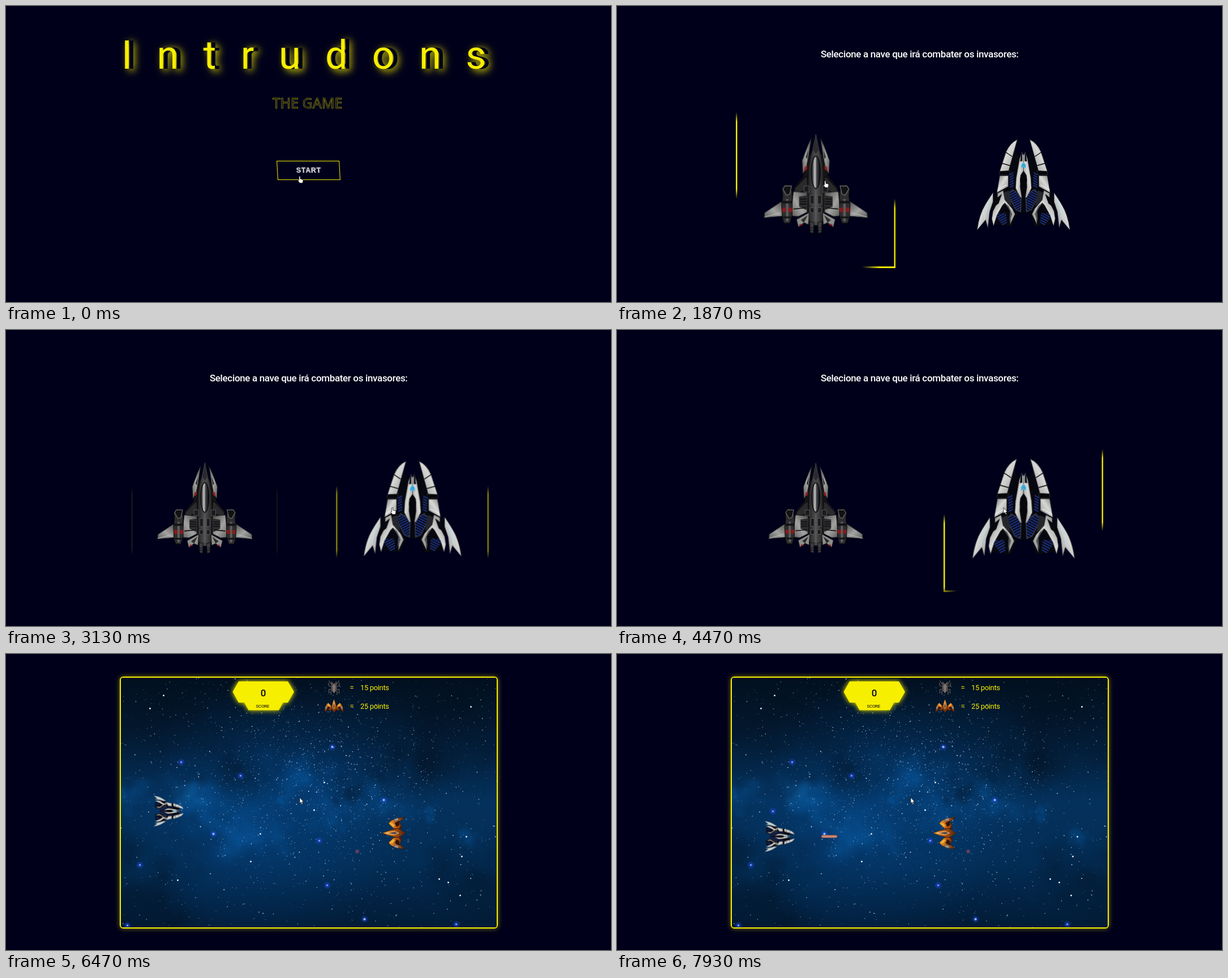
An HTML page with a canvas for the animation above (8000 ms loop, 1069 px wide and 524 px high).

```html
<!DOCTYPE html>
<html lang="pt">
<head>
<meta charset="utf-8">
<title>Intrudons</title>
<style>
:root { --y: #f7ef00; --bg: #00001a; }
html, body { margin: 0; width: 100%; height: 100%; overflow: hidden; background: var(--bg); }
#stage { position: relative; width: 1069px; height: 524px; overflow: hidden; background: var(--bg); font-family: Roboto, "Open Sans", sans-serif; }
section, .layer { position: absolute; left: 0; top: 0; width: 1069px; height: 524px; }
svg { overflow: visible; }
section, section *, .layer * { animation-duration: 8s; animation-iteration-count: infinite; }

/* screens */
#title { animation-name: title; animation-timing-function: step-end; }
#select { animation-name: select; animation-timing-function: step-end; }
#game { animation-name: game; animation-timing-function: step-end; }
@keyframes title { 0% { visibility: visible } 10.875%, 100% { visibility: hidden } }
@keyframes select { 0% { visibility: hidden } 10.875% { visibility: visible } 56.625%, 100% { visibility: hidden } }
@keyframes game { 0% { visibility: hidden } 56.625%, 100% { visibility: visible } }

/* title screen */
h1 { position: absolute; left: 204px; top: 52px; margin: 0; font-size: 70px; font-weight: 400; line-height: 1; letter-spacing: 43.4px; white-space: pre; color: var(--y); text-shadow: 8px 0 0 var(--bg), 8px 3px 16px var(--y), 8px 3px 12px rgba(247, 239, 0, .5); }
.outline { font: 25px "Noto Sans", "Open Sans", sans-serif; fill: none; stroke: var(--y); stroke-width: .5; }
#start { position: absolute; left: 479px; top: 274px; width: 109px; height: 32px; border: 1px solid var(--y); font: bold 12px/33px "Liberation Sans", Arial, sans-serif; letter-spacing: 1px; text-indent: 1px; text-align: center; color: #d2d2d6; -webkit-text-stroke: .5px #d2d2d6; animation-name: lean; animation-timing-function: ease-out; }
@keyframes lean { 0%, .8% { transform: skewX(3deg) } 6.6%, 100% { transform: skewX(20deg) } }

/* ship cards */
.ask { font-size: 17px; font-weight: 500; letter-spacing: -.35px; fill: #fff; text-anchor: middle; }
.card { position: absolute; top: 184.5px; width: 256px; height: 265px; overflow: hidden; animation-timing-function: ease-in-out; }
.card svg { position: absolute; left: 0; top: 0; width: 256px; height: 265px; }
.glow { position: absolute; inset: 0; animation-timing-function: ease-in-out; }
.bar { position: absolute; left: -82px; top: 93px; width: 420px; height: 122px; background: linear-gradient(transparent, var(--y) 11%, var(--y) 89%, transparent); animation-timing-function: linear; }
.cover { position: absolute; inset: 2px; background: var(--bg); }
.a { left: 222.5px; animation-name: growA; }
.a .glow { animation-name: showA; }
.a .bar { animation-name: spinA; }
.b { left: 590.3px; animation-name: growB; }
.b .glow { animation-name: showB; }
.b .bar { animation-name: spinB; }
@keyframes growA { 0%, 19% { transform: none } 23%, 36.125% { transform: scale(1.1) } 39.875%, 100% { transform: none } }
@keyframes showA { 0%, 19% { opacity: 0 } 23%, 36.125% { opacity: 1 } 39.875%, 100% { opacity: 0 } }
@keyframes spinA { 0%, 20.4% { transform: rotate(0deg) } 36.125% { transform: rotate(151deg) } 36.13%, 100% { transform: rotate(0deg) } }
@keyframes growB { 0%, 37% { transform: none } 41.25%, 100% { transform: scale(1.1) } }
@keyframes showB { 0%, 37% { opacity: 0 } 41.25%, 100% { opacity: 1 } }
@keyframes spinB { 0%, 39.125% { transform: rotate(0deg) } 56.625%, 100% { transform: rotate(164.5deg) } }

/* game */
#sky { position: absolute; left: 200.5px; top: 39.5px; border: 2px solid var(--y); border-radius: 6px; box-shadow: 0 0 8px rgba(247, 239, 0, .5); }
.badge { fill: var(--y); filter: drop-shadow(0 0 5px var(--y)); }
.points { font-size: 13px; letter-spacing: -.35px; fill: var(--y); }
.score { fill: #05051c; text-anchor: middle; }
#player { animation-name: dive; animation-timing-function: linear; }
#enemy { animation-name: attack; animation-timing-function: linear; }
#shot { animation-name: shoot; animation-timing-function: linear; }
@keyframes dive { 0%, 87.875% { transform: translate(287.5px, 278px) } 97.25%, 100% { transform: translate(287.5px, 323px) } }
@keyframes attack { 0%, 80.5% { transform: translate(688.2px, 317px) } 100% { transform: translate(574.4px, 317px) } }
@keyframes shoot {
  0%, 97.55% { opacity: 0; transform: translate(317px, 323px) }
  97.56% { opacity: 1; transform: translate(317px, 323px) }
  100% { opacity: 1; transform: translate(385.6px, 323px) }
}

/* pointer */
#pointer { animation-name: move; animation-timing-function: ease-in-out; }
#hand { animation-name: hand; animation-timing-function: step-end; }
#arrow { animation-name: arrow; animation-timing-function: step-end; }
@keyframes move {
  0%, 10.87% { transform: translate(519px, 302px) }
  10.875%, 16.625% { transform: translate(521px, 296px) }
  21.5%, 34.875% { transform: translate(368px, 310px) }
  38.625%, 59.25% { transform: translate(683px, 315px) }
  65%, 100% { transform: translate(519px, 254.5px) }
}
@keyframes hand { 0% { opacity: 1 } 10.875% { opacity: 0 } 19% { opacity: 1 } 36.125% { opacity: 0 } 37% { opacity: 1 } 55.5%, 100% { opacity: 0 } }
@keyframes arrow { 0% { opacity: 0 } 10.875% { opacity: 1 } 19% { opacity: 0 } 36.125% { opacity: 1 } 37% { opacity: 0 } 55.5%, 100% { opacity: 1 } }
</style>
</head>
<body>
<div id="stage">
<svg width="0" height="0" style="position:absolute">
  <defs>
    <linearGradient id="steel" x1="0" y1="0" x2="1" y2="1"><stop offset="0" stop-color="#4c4c4c"/><stop offset=".55" stop-color="#a2a2a0"/><stop offset="1" stop-color="#5c5c5c"/></linearGradient>
    <linearGradient id="hull"><stop offset="0" stop-color="#505052"/><stop offset="1" stop-color="#252527"/></linearGradient>
    <linearGradient id="pearl" x1="1" y1="0" x2="0" y2="1"><stop offset="0" stop-color="#747474"/><stop offset=".45" stop-color="#d8d8d6"/><stop offset="1" stop-color="#8a8a88"/></linearGradient>
    <linearGradient id="glass"><stop offset="0" stop-color="#0b0b0d"/><stop offset=".4" stop-color="#c8c8c8"/><stop offset=".6" stop-color="#44454a"/><stop offset="1" stop-color="#08080a"/></linearGradient>
    <linearGradient id="ember" x1="0" y1="0" x2="0" y2="1"><stop offset="0" stop-color="#f0a030"/><stop offset=".5" stop-color="#b8560f"/><stop offset="1" stop-color="#4a1f0b"/></linearGradient>
    <pattern id="ribs" width="4" height="4" patternUnits="userSpaceOnUse" patternTransform="rotate(28)"><path fill="#0a0c1a" d="M0 0h4v4H0z"/><path fill="#1f3797" d="M0 0h4v1.500H0z"/></pattern>

    <g id="jetHalf">
      <path fill="#141416" d="M0-81 3-62 8-50 15-42 20-12 35 6 36 18 14 28 14 58 0 66z"/>
      <path fill="url(#steel)" stroke="#111" stroke-width=".7" d="M7-75 13-62 22-38 21-16 15-28 12-44z"/>
      <path fill="#222" d="M12-55 16-44 14-40z"/>
      <path fill="#8c2020" d="M14-30 18-27 19-20 14-24z"/>
      <path fill="#2a2a2d" stroke="#0a0a0a" d="M14-12 18-10 34 7 34 16 13 8z"/>
      <path fill="url(#steel)" stroke="#222" stroke-width=".8" d="M14 14 36 12 40 51 28 52 14 45z"/>
      <path fill="#2c2c2e" d="M13 18 27 20 27 36 14 42z"/>
      <path stroke="#0e0e10" stroke-width="1.600" d="M15 24h11M15 28h11M15 32h11M16 38l20 2"/>
      <path fill="url(#steel)" stroke="#333" stroke-width=".8" d="M52 27 58 30 82 46 83 54 52 51z"/>
      <path stroke="#c8c8c8" stroke-width=".8" d="M57 46 82 53"/>
      <path fill="#2d2d2f" stroke="#0b0b0b" d="M38 14 41 3 48 1 54 8 53 20 55 32 54 54 51 63 42 63 38 50z"/>
      <path fill="#121214" stroke="#7c7c7b" stroke-width="1" d="M39 3 50 3 53 8 47 18 42 16z"/>
      <path fill="#5c5c5f" d="M44 24h4v36h-4z"/>
      <path fill="#861b1b" d="M38 38h6v7h-6zM48 38h6v7h-6z"/>
      <path fill="#151516" d="M38 27h16v4H38zM40 52h13v3H40z"/>
      <path fill="#8f8e8b" stroke="#222" stroke-width=".8" d="M11 46 31 57 28 69 19 62 12 65z"/>
      <path fill="#8c2020" d="M20 65 26 64 27 68z"/>
      <path fill="#2c2c2c" d="M13 50 24 58 19 62z"/>
      <path fill="url(#hull)" d="M0-56 5-55 8-44 11-28 12 8 11 56 7 66 0 66z"/>
      <path fill="#1b1b1d" stroke="#626262" stroke-width=".8" d="M11 3h8v10h-8zM3 18h6v14H3zM3 38h6v8H3z"/>
      <path fill="#3c3c3e" stroke="#111" d="M3 62 10 60 9 78 4 79z"/>
      <path stroke="#111" d="M4 70h6M4 74h6"/>
    </g>
    <g id="jet">
      <use href="#jetHalf"/><use href="#jetHalf" transform="scale(-1 1)"/>
      <path fill="#2b2b2d" stroke="#555" stroke-width=".6" d="M0-80 5-55 0-48-5-55z"/>
      <ellipse cy="-19" rx="7" ry="26" fill="url(#glass)" stroke="#0a0a0a" stroke-width="1.500"/>
      <path stroke="#6a6a6a" d="M0 10v50"/>
    </g>

    <g id="alienHalf">
      <path fill="#07080f" d="M16-62 23-30 40-22 46 10 60 32 50 70 20 74 10 48 0 50V-40z"/>
      <path fill="url(#pearl)" stroke="#222" stroke-width=".6" d="M11-80Q24-74 31-58L42-24 27-22Q20-48 11-80z"/>
      <path fill="none" stroke="#0c0c0c" stroke-width="1.500" d="M20-50 32-58M24-34 38-38"/>
      <path fill="url(#ribs)" d="M18-24 25-20 24 6 17 2z"/>
      <path fill="#05050a" stroke="#2c2c30" stroke-width=".8" d="M24-25 42-24 43-18 26-17z"/>
      <path fill="url(#pearl)" stroke="#222" stroke-width=".6" d="M27-16 42-16 47 14 38 9 27 3z"/>
      <path fill="none" stroke="#eee" stroke-width="1.200" d="M30 0 46 9"/>
      <path fill="url(#ribs)" stroke="#4a4b52" d="M4 18 20 8 27 18 14 44 5 48z"/>
      <path fill="#24262c" d="M25 10 35 14 32 31 21 38z"/>
      <path fill="url(#ribs)" d="M31 50 50 51 46 60 37 72 29 67z"/>
      <path fill="url(#pearl)" stroke="#222" stroke-width=".5" d="M36 10 46 15 46 31 54 47 56 60 53 73 47 54 37 36 33 32 22 48 24 71 15 52 20 42 33 27z"/>
      <path fill="#08090f" d="M38 16 48 24 53 40 44 33z"/>
      <path fill="#53555a" d="M26 38 31 33 24 47 25 66 20 52z"/>
      <path fill="url(#pearl)" stroke="#333" stroke-width=".5" d="M54 14Q64 29 68 36Q78 52 82 80L67 62 63 76 60 48 54 30z"/>
      <path fill="none" stroke="#b4dfe9" stroke-width="1.600" d="M58 27Q67 44 69 60"/>
      <path fill="url(#pearl)" stroke="#222" stroke-width=".6" d="M0-52 3-58 7-46 13-12 14 6 6 22 3 23 6 4 5-17 0-24z"/>
      <path fill="#10131d" d="M2-56 4-57 6-41 2-42z"/>
    </g>
    <g id="alien">
      <use href="#alienHalf"/><use href="#alienHalf" transform="scale(-1 1)"/>
      <path fill="#05050a" d="M0-25Q7-16 6-6Q4 6 0 25Q-4 6-6-6Q-7-16 0-25z"/>
      <path fill="#35a9dc" stroke="#8fcfe6" stroke-width=".8" d="M0-40 4-35 4-29 0-32-4-29-4-35z"/>
    </g>

    <g id="foeHalf">
      <path fill="#4a1c08" d="M4 0 16 0 20 10 8 14z"/>
      <path fill="url(#ember)" stroke="#35190c" stroke-width=".7" d="M8-1 17-10Q24-6 27 8L28 19 20 9 13 12 8 9z"/>
      <path fill="#eeb040" d="M11-2 17-8 18-3 13 1z"/>
      <path fill="#98938e" stroke="#333" stroke-width=".5" d="M21 0 25 0 27 7 22 8z"/>
      <path fill="#2e140c" d="M11 4 18 1 22 9 14 9z"/>
    </g>
    <g id="foe">
      <use href="#foeHalf"/><use href="#foeHalf" transform="scale(-1 1)"/>
      <path fill="url(#ember)" stroke="#48200d" stroke-width=".7" d="M0-21 4-10 8 6 5 12 0 20-5 12-8 6-4-10z"/>
      <path fill="none" stroke="#e8c890" d="M0-15 3 0 0 8-3 0z"/>
      <path fill="#4a4a50" d="M0-8 2 1 0 6-2 1z"/>
    </g>

    <g id="bugHalf" fill="none" stroke="#5f5552" stroke-width="1.300">
      <path d="M2-3 6-7 9-12M3 0 9-3 10-8M3 3 9 4 9 11M2 5 6 8 5 13"/>
      <path fill="#4a403d" d="M1-5 4-9 4 5 1 8z"/>
    </g>
    <g id="bug">
      <use href="#bugHalf"/><use href="#bugHalf" transform="scale(-1 1)"/>
      <path fill="#7d7572" d="M0-7 3-2 2 6 0 11-2 6-3-2z"/>
    </g>
  </defs>
</svg>

<section id="title">
  <h1>Intrudons</h1>
  <svg class="layer"><text class="outline" x="532.5" y="181" text-anchor="middle">THE GAME</text></svg>
  <div id="start">START</div>
</section>

<section id="select">
  <svg class="layer"><text class="ask" x="534.7" y="90.5">Selecione a nave que irá combater os invasores:</text></svg>
  <div class="card a">
    <div class="glow"><div class="bar"></div></div><div class="cover"></div>
    <svg><use href="#jet" x="128.3" y="130.5"/></svg>
  </div>
  <div class="card b">
    <div class="glow"><div class="bar"></div></div><div class="cover"></div>
    <svg><use href="#alien" x="128.3" y="131.5"/></svg>
  </div>
</section>

<section id="game">
  <canvas id="sky" width="664" height="442"></canvas>
  <svg class="layer">
    <path class="badge" d="M400.5 67 411 48.500H498L509 67 498 86H489.500L482 99.500H428.500L421 86H411z"/>
    <text class="score" x="454.5" y="75" font-size="17" font-weight="500">0</text>
    <text class="score" x="453.3" y="95" font-size="8" letter-spacing="-.3">SCORE</text>
    <use href="#bug" x="579.5" y="59"/>
    <use href="#foe" transform="translate(579.5 92.5) scale(.59)"/>
    <text class="points" x="607.5" y="64">=</text><text class="points" x="626" y="64">15 points</text>
    <text class="points" x="607.5" y="97">=</text><text class="points" x="626" y="97">25 points</text>
    <g id="shot"><rect y="-2.2" width="27.5" height="4.5" rx="1.8" fill="#cf8674" stroke="#8d4a3c" stroke-width=".6"/></g>
    <g id="player"><use href="#alien" transform="rotate(90) scale(.33)"/></g>
    <g id="enemy"><use href="#foe" transform="rotate(-90)"/></g>
  </svg>
</section>

<svg class="layer">
  <g id="pointer" stroke="#000" stroke-width=".7">
    <path id="arrow" fill="#fff" d="M0-.5V10L2.300 7.900 4 11.800 5.700 11 4 7.300H7z"/>
    <path id="hand" fill="#fff" d="M-1.300 0Q0-1.300 1 0V4L5 5Q6.300 5.400 6 7L5 11.500H0L-3 7.500Q-3 5.600-1.300 6.500z"/>
  </g>
</svg>
</div>

<script>
const ctx = document.getElementById('sky').getContext('2d');
ctx.translate(-202.5, -41.5); // draw in stage coordinates

let seed = 71;
const rnd = () => (seed = (seed * 16807) % 2147483647) / 2147483647;
const bell = () => rnd() + rnd() + rnd() - 1.5;

function blob(x, y, r, rgb, alpha) {
  const g = ctx.createRadialGradient(x, y, 0, x, y, r);
  g.addColorStop(0, `rgba(${rgb},${alpha})`);
  g.addColorStop(.5, `rgba(${rgb},${alpha * .4})`);
  g.addColorStop(1, `rgba(${rgb},0)`);
  ctx.fillStyle = g;
  ctx.fillRect(x - r, y - r, 2 * r, 2 * r);
}

// a cloud is a cluster of soft blobs
function cloud(x, y, size, rgb, alpha) {
  for (let i = 0; i < 30; i++)
    blob(x + bell() * size * 1.2, y + bell() * size * .8, size * (.2 + rnd() * .5), rgb, alpha);
}

function dot(x, y, r, color) {
  ctx.fillStyle = color;
  ctx.beginPath();
  ctx.arc(x, y, r, 0, 7);
  ctx.fill();
}

const base = ctx.createLinearGradient(0, 40, 0, 485);
[[0, '#020f1e'], [.25, '#031d38'], [.5, '#04315c'], [.75, '#032c54'], [1, '#021b36']]
  .forEach(([at, c]) => base.addColorStop(at, c));
ctx.fillStyle = base;
ctx.fillRect(200, 40, 670, 446);

const blue = '10,105,190', deep = '5,70,135', dark = '1,12,26';
blob(430, 300, 240, deep, .5);
blob(560, 240, 200, deep, .3);
[[260, 110, 90], [800, 110, 110], [850, 390, 90], [245, 370, 70], [415, 210, 45], [620, 250, 35], [700, 200, 60], [250, 460, 70]]
  .forEach(([x, y, s]) => cloud(x, y, s, dark, .11));
[[335, 250, 38], [365, 285, 40], [425, 320, 52], [215, 245, 34], [575, 290, 36], [520, 215, 45], [660, 260, 45], [490, 258, 14], [810, 325, 18], [745, 285, 16]]
  .forEach(([x, y, s]) => cloud(x, y, s, blue, .09));
cloud(325, 246, 26, '30,145,225', .07);
cloud(420, 325, 38, '15,120,210', .06);

for (let i = 0; i < 2300; i++) {
  const spread = i % 3;
  const x = spread ? 530 + bell() * 270 : 202 + rnd() * 666;
  const y = spread ? 225 + bell() * 190 : 41 + rnd() * 444;
  dot(x, y, .35 + rnd() * rnd() * .7, `rgba(215,230,255,${.35 + rnd() * .65})`);
}

[[254, 96], [821, 93], [562, 227], [449, 318], [802, 427], [813, 323], [781, 404], [765, 398], [278, 73], [303, 400], [432, 367], [544, 276], [805, 358]]
  .forEach(([x, y]) => dot(x, y, 1.4, '#eef6ff'));

[[576, 164], [414, 215], [309, 191], [366, 318], [553, 330], [567, 409], [667, 258], [236, 373], [275, 278], [633, 469], [214, 480], [795, 478]]
  .forEach(([x, y], i) => {
    blob(x, y, 7, '40,80,255', .9);
    dot(x, y, i % 3 ? 1.3 : 2, '#8fbcff');
  });
blob(620, 349, 5, '190,80,110', .8);
</script>
</body>
</html>
```
